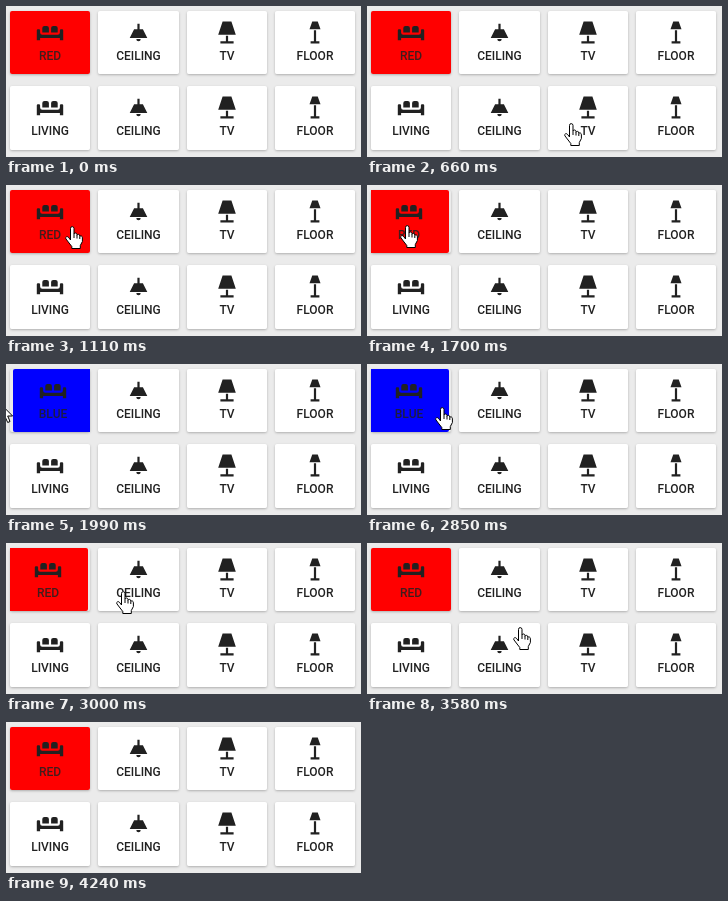
Animation of 355 by 151 pixels, one loop 5140 ms. Source, as an HTML page with a canvas:

```html
<!DOCTYPE html>
<html lang="en">
<head>
<meta charset="utf-8">
<title>Light buttons</title>
<style>
html, body { margin: 0; width: 100%; height: 100%; overflow: hidden; background: #ebebeb; }
canvas { display: block; width: 355px; height: 151px; }
</style>
</head>
<body>
<canvas id="stage" width="355" height="151"></canvas>
<script>
const ctx = document.getElementById('stage').getContext('2d');
const LOOP = 5140;
const PAGE = '#ebebeb';
const INK = '#212121';

// Icons on a 24 unit grid
const icons = {
  sofa: new Path2D('M7 6H9A2 2 0 0 1 11 8V12H5V8A2 2 0 0 1 7 6ZM15 6H17A2 2 0 0 1 19 8V12H13V8A2 2 0 0 1 15 6Z' +
    'M1 9H2A1 1 0 0 1 3 10V12A2 2 0 0 0 5 14H19A2 2 0 0 0 21 12V10A1 1 0 0 1 22 9H23A1 1 0 0 1 24 10V19H21V17H3V19H0V10A1 1 0 0 1 1 9Z'),
  ceiling: new Path2D('M8 9H11V4H13V9H16L20 17H4ZM14 18A2 2 0 0 1 10 18Z'),
  lamp: new Path2D('M8 2H16L20 14H4ZM11 15H13V20H18V22H6V20H11Z'),
  floor: new Path2D('M9.5 2H14.5L17 9H7ZM11 10H13V20H16V22H8V20H11Z')
};

const pointers = {
  hand: new Path2D('M5.5 14V2.5Q5.5 .6 7.2 .6T9 2.5V8Q9.3 6.9 10.6 7T12 8.5V9.2Q12.4 8.2 13.6 8.4T14.8 10V10.5' +
    'Q15.4 9.6 16.4 10T17.4 11.8V15.5L15.3 19.5V22.5H6.8V20.5L3.3 16L.9 12.8Q.2 11.4 1.5 10.8T3.8 11.7Z'),
  arrow: new Path2D('M.5 .8V16.5L4.2 13L6.7 18.5L9 17.5L6.7 12H11.6Z')
};
const fingers = new Path2D('M9 8V12M12 9V12.5M14.8 10.5V13');

// [start, pointer, x, y]
const moves = [
  [0], [660, 'hand', 197, 117], [810, 'hand', 140, 63], [960, 'hand', 100, 48],
  [1110, 'hand', 59, 41], [1260, 'hand', 54, 40], [1700, 'hand', 33, 40],
  [1840, 'arrow', -5, 40], [2260, 'hand', 14, 39], [2390, 'hand', 25, 38],
  [2850, 'hand', 68, 43], [3000, 'hand', 110, 48], [3580, 'hand', 146, 84],
  [3700, 'hand', 202, 118], [3820, 'arrow', 238, 139], [3970, 'arrow', 276, 146], [4240]
];

// [start, label, colour, shift]
const RED = '#ff0000', BLUE = '#0000ff';
const shakes = [
  [0, 'RED', RED, 0], [1700, 'RED', RED, -2], [1840, 'BLUE', BLUE, -3],
  [1990, 'BLUE', BLUE, 3], [2110, 'BLUE', BLUE, 0], [2850, 'BLUE', BLUE, -2],
  [3000, 'RED', RED, -2], [3120, 'RED', RED, 3], [3280, 'RED', RED, 0]
];

const columns = [[4, 80, 'sofa', 'LIVING'], [92, 81, 'ceiling', 'CEILING'], [181, 80, 'lamp', 'TV'], [269, 80, 'floor', 'FLOOR']];

const current = (steps, t) => steps.filter(s => s[0] <= t).pop();

function plate(x, y, w, h, fill) {
  ctx.beginPath();
  ctx.roundRect(x, y, w, h, 2);
  ctx.fillStyle = fill;
  ctx.fill();
}

function shadow(x, y, w, h) {
  ctx.save();
  ctx.shadowColor = 'rgba(0,0,0,.26)';
  ctx.shadowBlur = 2.5;
  ctx.shadowOffsetY = 1;
  plate(x, y, w, h, PAGE);
  ctx.restore();
}

function content(cx, y, icon, label, ink) {
  ctx.save();
  ctx.translate(cx, y + 21.5);
  ctx.scale(1.1, 1.1);
  ctx.translate(-12, -12);
  ctx.fillStyle = INK;
  ctx.fill(icons[icon]);
  ctx.restore();
  ctx.fillStyle = ink;
  ctx.font = '500 12px Roboto, sans-serif';
  ctx.textAlign = 'center';
  ctx.fillText(label, cx, y + 49);
}

function card(x, y, w, h, icon, label) {
  shadow(x, y, w, h);
  plate(x, y, w, h, '#fff');
  content(x + w / 2, y, icon, label, INK);
}

function colourCard(t) {
  const [, label, colour, shift] = current(shakes, t);
  shadow(4, 5, 80, 63);
  ctx.save();
  ctx.beginPath();
  ctx.rect(4, 5, 80, 63);
  ctx.clip();
  plate(4 + shift, 5, 80, 63, colour);
  content(44 + shift, 5, 'sofa', label, 'rgba(33,33,33,.85)');
  ctx.restore();
}

function pointer(t) {
  const [, kind, x, y] = current(moves, t);
  if (!kind) return;
  ctx.save();
  ctx.translate(x, y);
  ctx.fillStyle = '#fff';
  ctx.strokeStyle = '#000';
  ctx.lineWidth = 1;
  ctx.lineJoin = 'round';
  ctx.fill(pointers[kind]);
  ctx.stroke(pointers[kind]);
  if (kind === 'hand') ctx.stroke(fingers);
  ctx.restore();
}

function draw(t) {
  ctx.fillStyle = PAGE;
  ctx.fillRect(0, 0, 355, 151);
  columns.forEach(([x, w, icon, label], i) => {
    if (i) card(x, 5, w, 63, icon, label);
    card(x, 80, w, 64, icon, label);
  });
  colourCard(t);
  pointer(t);
}

const start = performance.now();
function tick() {
  draw((performance.now() - start) % LOOP);
  requestAnimationFrame(tick);
}
tick();
</script>
</body>
</html>
```
